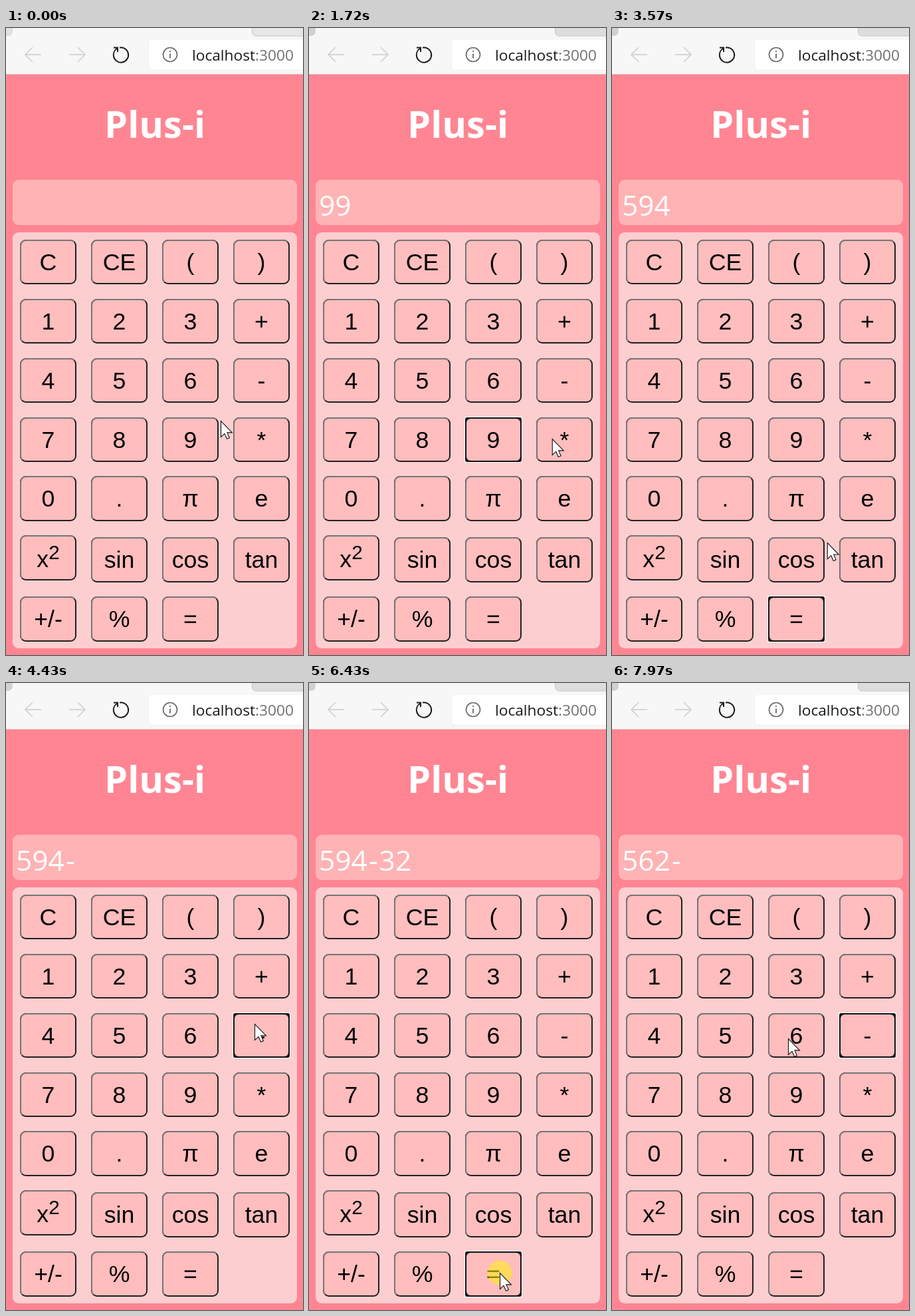
These frames come from a looping animation (447x942 px, 8000 ms). An HTML page with a canvas:

```html
<!DOCTYPE html>
<html lang="en">
<head>
<meta charset="utf-8">
<title>Calculator</title>
<style>
  html, body { margin: 0; width: 447px; height: 942px; overflow: hidden; }
  canvas { display: block; }
</style>
</head>
<body>
<canvas id="stage" width="447" height="942"></canvas>
<script>
const ctx = document.getElementById('stage').getContext('2d');
const LOOP = 8000, STEP = 77.2, STEP_START = 250;
const HOLD = 80, LINGER = 160, SETTLE = 150, LONGEST_MOVE = 780;
const UI = '"Open Sans", "Noto Sans", sans-serif';
const KEY_FONT = '"Liberation Sans", Arial, sans-serif';
const KEY_SIZE = 35.7, KEY_FILL = '#ffbdbd';

// Four keys per row; the superscript key sits above the baseline of its row.
const labels = 'C CE ( ) 1 2 3 + 4 5 6 - 7 8 9 * 0 . π e x2 sin cos tan +/- % ='.split(' ');
const keys = labels.map((label, i) => {
  const row = Math.floor(i / 4);
  const top = 318.05 + 88.85 * row + (row > 4 && label !== 'x2' ? 3 : 0);
  const y = Math.round(top);
  return { label, x: 21 + 107 * (i % 4), y, w: 85, h: Math.round(top + 67.4) - y };
});

// Where the pointer rests on a key, and when it presses there.
function stop(press, label, dx = 0, dy = 0) {
  const key = keys.find(k => k.label === label);
  return { press, label, x: key.x + 40 + dx, y: key.y + 32 + dy };
}

const origin = stop(12, '9', 48, -27);
const clicks = [
  stop(790, '9'), stop(1190, '9'), stop(2030, '*'), stop(2570, '6', 13, 4),
  stop(3260, '=', 28, -5), stop(4340, '-', -8, -16), stop(4960, '3', 31, 8),
  stop(5500, '2', 10, 12), stop(6430, '=', 12), stop(7660, '-', -2, -13),
  stop(8120, '6', -10, 6)
];

function pointer(t) {
  let { x, y, press } = origin;
  for (const next of clicks) {
    const arrive = next.press - SETTLE;
    const leave = Math.max(press + LINGER, arrive - LONGEST_MOVE);
    const u = Math.min(1, Math.max(0, (t - leave) / (arrive - leave)));
    const eased = 1 - (1 - u) ** 1.6;
    x += (next.x - x) * eased;
    y += (next.y - y) * eased;
    press = next.press;
  }
  return [x, y];
}

function enter(value, key) {
  if (key !== '=') return value + key;
  const [, a, op, b] = value.match(/(\d+)(\D)(\d+)/);
  return String(op === '*' ? a * b : a - b);
}

function box(x, y, w, h, r, fill) {
  ctx.beginPath();
  ctx.roundRect(x, y, w, h, r);
  if (fill) { ctx.fillStyle = fill; ctx.fill(); }
}

function stroke(color, width) {
  ctx.strokeStyle = color;
  ctx.lineWidth = width;
  ctx.stroke();
}

function circle(x, y, r, from = 0, to = 2 * Math.PI) {
  ctx.beginPath();
  ctx.arc(x, y, r, from, to);
}

function line(points, color, width) {
  ctx.beginPath();
  points.forEach(p => ctx.lineTo(...p));
  stroke(color, width);
}

function text(str, x, y, font, color, align = 'left') {
  ctx.font = font;
  ctx.fillStyle = color;
  ctx.textAlign = align;
  ctx.fillText(str, x, y);
  return ctx.measureText(str).width;
}

function arrow(x, dir) {
  const tip = x + 12 * dir, back = tip - 11 * dir;
  line([[x - 12 * dir, 40], [tip, 40]], '#cfcfcf', 1.6);
  line([[back, 29], [tip, 40], [back, 51]], '#cfcfcf', 1.6);
}

function drawBrowser(t) {
  const warm = t >= clicks[0].press;
  box(0, 0, 447, 69, 0, '#f7f7f7');
  box(0, 69, 447, 1, 0, '#e6c0c4');
  box(-10, -10, 19, 21, 5, warm ? '#d2d1cb' : '#e2e2e2');
  stroke('#c9c9c9', 1);
  box(370.5, -10, 90, 22, 6, warm ? '#dddddb' : '#e6e6e6');
  stroke('#c6c6c3', 1);
  arrow(41, -1);
  arrow(107, 1);
  circle(173, 40.5, 11.2, -1.75, 4.2);
  stroke('#1d1d1d', 2);
  line([[162, 29.5], [168, 29.5], [168, 36]], '#1d1d1d', 2);
  box(214, 18, 250, 46, 6, '#eeeeee');
  box(215, 18, 250, 45, 5, '#ffffff');
  circle(247, 40, 10.5);
  stroke('#666666', 1.6);
  line([[247, 38.5], [247, 45.5]], '#666666', 1.8);
  line([[247, 34], [247, 36]], '#666666', 1.8);
  const font = '22.7px ' + UI;
  const w = text('localhost', 280, 49, font, '#1a1a1a');
  text(':3000', 280 + w, 49, font, '#707070');
}

function drawDisplay(value) {
  box(10, 228, 428, 68, 9, '#ffb3b4');
  let x = 15;
  for (const part of value.match(/\d+|\D/g) || []) {
    const gap = part === '-' ? 2 : 0;
    x += text(part, x + gap, 282, '42.5px ' + UI, '#ffffff') + 2 * gap;
  }
}

function drawBevel(x, y, w, h) {
  box(x, y, w, h, 9, '#212121');
  ctx.save();
  ctx.beginPath();
  [[x, y + h], [x, y], [x + w, y], [x + w - 10, y + 10], [x + 10, y + h - 10]]
    .forEach(p => ctx.lineTo(...p));
  ctx.clip();
  box(x, y, w, h, 9, '#767676');
  ctx.restore();
  box(x + 2, y + 2, w - 4, h - 4, 7, KEY_FILL);
}

function drawFocus(x, y, w, h) {
  box(x - 1, y - 1, w + 2, h + 2, 2, '#ffffff');
  box(x, y, w, h, 3, '#101010');
  box(x + 2, y + 2, w - 4, h - 4, 6, KEY_FILL);
}

function drawKey({ label, x, y, w, h }, focused) {
  (focused ? drawFocus : drawBevel)(x, y, w, h);
  const middle = x + w / 2, font = KEY_SIZE + 'px ' + KEY_FONT;
  if (label === 'x2') {
    text('x', middle + 0.7, y + 48, font, '#000', 'right');
    text('2', middle + 0.7, y + 36, KEY_SIZE / 1.2 + 'px ' + KEY_FONT, '#000');
  } else {
    text(label, middle, y + 46, font, '#000', 'center');
  }
}

function drawPointer([x, y], pressed) {
  if (pressed) {
    circle(x, y, 18.5);
    ctx.fillStyle = 'rgba(255, 240, 20, 0.56)';
    ctx.fill();
  }
  ctx.beginPath();
  [[0, 0], [0, 17], [3.9, 13.4], [6.4, 19], [9.1, 17.9], [6.7, 12.3], [12, 12.3]]
    .forEach(([dx, dy]) => ctx.lineTo(x + 0.5 + dx * 1.41, y + 0.5 + dy * 1.41));
  ctx.closePath();
  ctx.fillStyle = '#ffffff';
  ctx.fill();
  stroke('#111111', 1.1);
}

function draw(t) {
  let focus = '', value = '', pressed = false;
  for (const { press, label } of clicks.filter(c => c.press <= t)) {
    focus = label;
    pressed = t < press + HOLD;
    if (!pressed) value = enter(value, label);
  }
  box(0, 0, 447, 942, 0, '#ff8593');
  drawBrowser(t);
  text('Plus-i', 224, 165, 'bold 56px ' + UI, '#ffffff', 'center');
  drawDisplay(value);
  box(10, 307, 428, 625, 9, '#fdced0');
  keys.forEach(key => drawKey(key, key.label === focus));

  // The pointer moves at a fixed, coarse rate.
  const tick = Math.floor((t - STEP_START) / STEP + 0.05);
  drawPointer(pointer(STEP_START + tick * STEP), pressed);
}

const start = performance.now();
function frame() {
  draw((performance.now() - start) % LOOP);
  requestAnimationFrame(frame);
}
frame();
</script>
</body>
</html>
```
